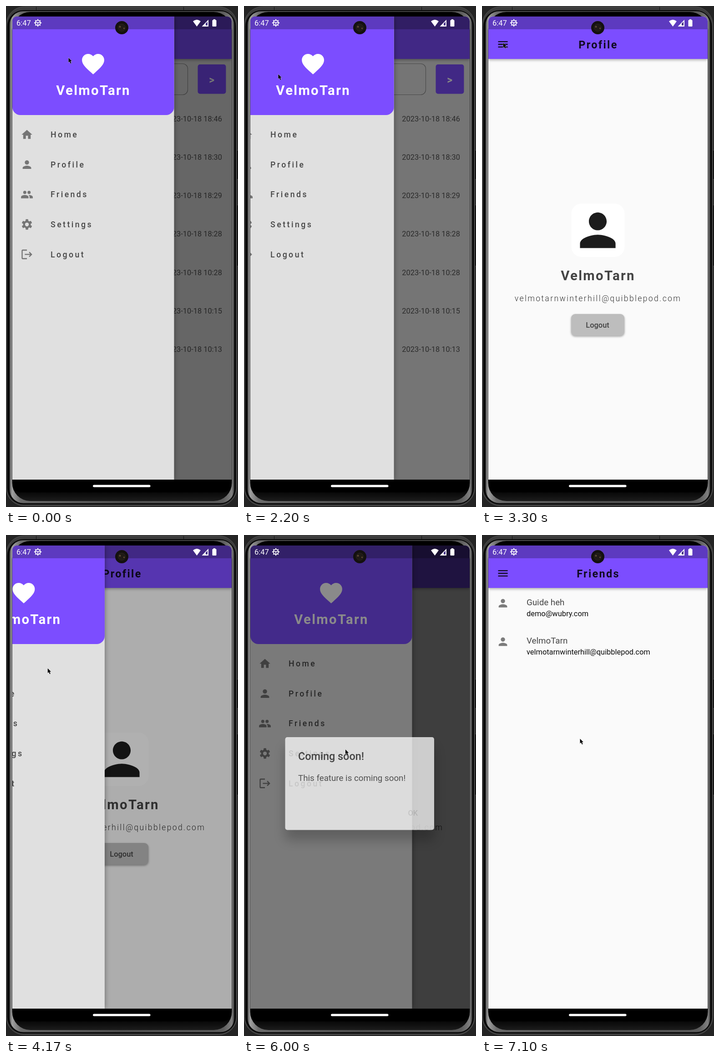
These frames come from a looping animation (510 by 1098 pixels, 7560 ms). An HTML page:

```html
<!DOCTYPE html>
<html lang="en">
<head>
<meta charset="utf-8">
<title>Climbing app walkthrough</title>
<style>
  html, body { margin: 0; width: 100%; height: 100%; overflow: hidden; background: #242424; }
  #stage { display: block; width: 100vw; height: 100vh; font-family: Roboto, sans-serif; }
  .bar { filter: drop-shadow(0 2px 3px rgba(0,0,0,.35)); }
  .drawer { filter: drop-shadow(0 0 6px rgba(0,0,0,.4)); }
  .raised { filter: drop-shadow(0 2px 2px rgba(0,0,0,.35)); }
  #dialog { filter: drop-shadow(0 22px 13px rgba(0,0,0,.3)); }
</style>
</head>
<body>
<svg id="stage" viewBox="0 0 510 1098" preserveAspectRatio="none"></svg>
<script>
const LOOP = 7560, PURPLE = '#7c4dff', USER = 'VelmoTarn', MAIL = 'velmotarnwinterhill@quibblepod.com';
const ROW = 65.6, TILE = 84.3, DRAWER = 355.5;

const ICONS = {
  home: 'M10 20v-6h4v6h5v-8h3L12 3 2 12h3v8z',
  person: 'M12 12c2.21 0 4-1.79 4-4s-1.79-4-4-4-4 1.79-4 4 1.79 4 4 4zm0 2c-2.67 0-8 1.34-8 4v2h16v-2c0-2.66-5.33-4-8-4z',
  people: 'M16 11a3 3 0 1 0 0-6a3 3 0 0 0 0 6zM8 11a3 3 0 1 0 0-6a3 3 0 0 0 0 6zm0 2c-2.33 0-7 1.17-7 3.5V19h14v-2.5c0-2.33-4.67-3.5-7-3.5zm8 0c-.29 0-.62.02-.97.05 1.16.84 1.97 1.97 1.97 3.45V19h6v-2.5c0-2.33-4.67-3.5-7-3.5z',
  logout: 'M17 7l-1.41 1.41L18.17 11H8v2h10.17l-2.58 2.58L17 17l5-5zM4 5h8V3H4c-1.1 0-2 .9-2 2v14c0 1.1.9 2 2 2h8v-2H4V5z',
  menu: 'M3 18h18v-2H3zm0-5h18v-2H3zm0-7v2h18V6z',
  heart: 'M12 21.35l-1.45-1.32C5.4 15.36 2 12.28 2 8.5 2 5.42 4.42 3 7.5 3c1.74 0 3.41.81 4.5 2.09C13.09 3.81 14.76 3 16.5 3 19.58 3 22 5.42 22 8.5c0 3.78-3.4 6.86-8.55 11.54z'
};

// Drawing helpers: each returns SVG markup.
const rect = (x, y, w, h, fill, more = '') =>
  `<rect x="${x}" y="${y}" width="${w}" height="${h}" fill="${fill}" ${more}/>`;
const text = (x, y, str, size, fill, more = '') =>
  `<text x="${x}" y="${y}" font-size="${size}" fill="${fill}" ${more}>${str.replace('>', '&gt;')}</text>`;
const place = (cx, cy, size, inner) =>
  `<g transform="translate(${cx - size / 2} ${cy - size / 2}) scale(${size / 24})">${inner}</g>`;
const icon = (name, cx, cy, fill, size = 28.1) =>
  place(cx, cy, size, `<path d="${ICONS[name]}" fill="${fill}"/>`);
const teeth = (count, x, y, w, h, fill) => Array.from({length: count}, (_, i) =>
  rect(x, y, w, h, fill, `rx=".8" transform="rotate(${i * 360 / count} 12 12)"`)).join('');
const gear = (cx, cy, fill) => place(cx, cy, 28.1,
  `<circle cx="12" cy="12" r="5.4" fill="none" stroke="${fill}" stroke-width="3.7"/>` + teeth(6, 9.6, 2.2, 4.8, 4.6, fill));
const MIDDLE = 'text-anchor="middle"';
const bold = ls => `${MIDDLE} font-weight="700" letter-spacing="${ls}"`;

const tile = (y, title, sub) => icon('person', 46, y, '#7b7b7b') +
  text(98, y + 4.5, title, 18.75, '#464646') + text(98, y + 28, sub, 16.4, '#0c0c0c');

function homeParts() {
  const date = (i, d) => text(475, 252.5 + i * TILE, '2023-10-18 ' + d, 16.4, '#505050', 'text-anchor="end"');
  const posts = [['idkwns', USER], ['lesggogoooo', 'demo'], ['hey waddups peepssja', USER],
    ['SHEEESH', 'demo'], ['SHEESH', USER], ['First post here!', USER]];
  const composer = rect(23.5, 126.5, 376, 68, 'none', 'rx="11" stroke="#8c8c8c" stroke-width="1.2"') +
    text(37, 165.5, 'How was the climb?', 16.4, '#555', 'font-weight="500"') +
    rect(421.5, 128, 62, 64.5, PURPLE, 'rx="5"') + text(452.3, 169.5, '>', 23, '#fff', MIDDLE + ' font-weight="700"');
  const list = icon('person', 46, 237.5, '#7b7b7b') +
    text(98, 233, 'The blue project was', 18.75, '#464646') + text(98, 255, 'insane!', 18.75, '#464646') +
    text(98, 275, USER, 16.4, '#0c0c0c') +
    posts.map(([title, who], i) => tile(321.7 + i * TILE, title, who)).join('') +
    ['18:46', '18:30', '18:29', '18:28', '10:28', '10:15', '10:13'].map((d, i) => date(i, d)).join('');
  return {title: 'GripMoss', bg: '#e0e0e0', fixed: composer, loaded: list};
}

const profileParts = () => ({title: 'Profile', bg: '#fafafa', fixed: '', loaded:
  rect(196.4, 433, 117, 117, '#fff', 'rx="22"') + icon('person', 254.5, 491.5, '#1c1c1c', 117.2) +
  text(255, 600.5, USER, 29.3, '#444', bold(2.34)) +
  text(255, 647, MAIL, 17.6, '#333', MIDDLE + ' font-weight="300" letter-spacing="2.34"') +
  rect(196, 675, 117, 47.5, '#bdbdbd', 'rx="9" class="raised"') +
  text(254, 705, 'Logout', 16.4, '#424242', MIDDLE + ' font-weight="500"')});

const friendsParts = () => ({title: 'Friends', bg: '#fafafa', fixed: '', loaded:
  tile(149.5, 'Guide heh', 'demo@wubry.com') + tile(149.5 + TILE, USER, MAIL)});

function drawer([tapX, tapY, tapRow]) {
  const rows = [['home', 'Home'], ['person', 'Profile'], ['people', 'Friends'], ['gear', 'Settings'], ['logout', 'Logout']];
  const rowTop = 249.2 + tapRow * ROW;
  return rect(14, 23, DRAWER, 1015, '#e0e0e0') +
    `<path d="M14 23h${DRAWER}v198.500a17.500 17.500 0 0 1-17.500 17.500h${35 - DRAWER}a17.500 17.500 0 0 1-17.500-17.500z" fill="${PURPLE}"/>` +
    icon('heart', 191.5, 127, '#fff', 58.6) + text(192, 195.3, USER, 29.3, '#fff', bold(2.34)) +
    `<svg x="14" y="${rowTop}" width="${DRAWER}" height="${ROW}"><circle class="splash" cx="${tapX - 14}" cy="${tapY - rowTop}" opacity=".06"/></svg>` +
    rows.map(([name, label], i) => {
      const y = 282 + i * ROW;
      return (name === 'gear' ? gear(46, y, '#757575') : icon(name, 46, y, '#757575')) +
        text(98, y + 6.2, label, 17.6, '#464646', 'font-weight="500" letter-spacing="3.5"');
    }).join('');
}

// Every page is pushed over the previous one; its drawer opens at drawerAt.
const pages = [
  {parts: homeParts(), enterAt: -9999, drawerAt: -9999, tap: [153, 291, 0]},
  {parts: homeParts(), enterAt: 1373, drawerAt: 2038, tap: [156, 343, 1]},
  {parts: profileParts(), enterAt: 2733, drawerAt: 4088, tap: [150, 405, 2]},
  {parts: friendsParts(), enterAt: 6603, drawerAt: 1e9, tap: [0, 0, 0]}
];

const pageMarkup = ({parts, tap}) => `<g class="page">
  ${rect(14, 23, 482, 1015, '#000', 'class="veil"')}
  <g class="sheet">${rect(14, 23, 482, 1015, parts.bg)}${parts.fixed}
    <g class="loaded">${parts.loaded}</g>
    <circle class="spinner" cx="255" cy="577" r="19" fill="none" stroke="#d2d2d2" stroke-width="4.7" pathLength="100"/>
    ${rect(14, 23, 482, 93, PURPLE, 'class="bar"')}
    ${icon('menu', 46, 84, 'rgba(0,0,0,.87)')}
    ${text(255.5, 92.5, parts.title, 23.4, 'rgba(0,0,0,.87)', bold(2.34))}
    ${rect(14, 23, 482, 1015, '#000', 'class="dim"')}
    <g class="drawer">${drawer(tap)}</g>
  </g></g>`;

// Nested shells from the outside in: casing, dark seam, metal rim, glass.
const phone = `<defs>
    <linearGradient id="metal"><stop offset="0" stop-color="#555"/><stop offset=".011" stop-color="#a0a0a0"/>
      <stop offset=".05" stop-color="#6a6a6a"/><stop offset=".5" stop-color="#505050"/><stop offset=".95" stop-color="#5c5c5c"/>
      <stop offset=".99" stop-color="#808080"/><stop offset="1" stop-color="#444"/></linearGradient>
    <linearGradient id="glass" x2="0" y2="1"><stop offset=".975" stop-color="#000"/><stop offset="1" stop-color="#1c1c1c"/></linearGradient>
    <clipPath id="screen">${rect(14, 23, 482, 1060, '#000', 'rx="10"')}</clipPath>
    <clipPath id="view">${rect(14, 23, 482, 1015, '#000')}</clipPath></defs>` +
  rect(0, 0, 510, 1098, '#242424') +
  rect(507.5, 316, 5, 64, '#080808', 'stroke="#444"') + rect(507.5, 436, 5, 134, '#080808', 'stroke="#444"') +
  rect(.5, 1.5, 507, 1094, '#3c3c3c', 'rx="40" stroke="#555"') +
  rect(66, 2, 1, 7, '#111') + rect(390, 2, 1, 7, '#111') +
  rect(2.5, 9, 503, 1083.5, '#0a0a0a', 'rx="36"') +
  rect(8, 11.5, 493.5, 1078, 'url(#metal)', 'rx="30"') +
  rect(13.5, 13, 483, 1072, 'url(#glass)', 'rx="40"') +
  rect(14, 1020, 482, 46, '#000', 'rx="20"');

const statusBar = rect(14, 23, 482, 28, '#000', 'opacity=".25"') +
  text(23, 43, '6:47', 16.4, '#fff') +
  place(70, 37, 19, '<circle cx="12" cy="12" r="7" fill="none" stroke="#fff" stroke-width="2.2"/>' +
    teeth(8, 10.8, 1.6, 2.4, 4, '#fff') + '<path d="M6 11h12M12 12v6" stroke="#fff" stroke-width="2"/>') +
  '<path d="M411 33.5q8.500-7 17 0L419.500 45z" fill="#fff"/>' +
  '<path d="M430.500 45L445 30v15z" fill="#fff"/><path d="M439 42.500v-4l4-4v8z" fill="#402884"/>' +
  rect(453.5, 30.5, 9, 14.5, '#fff', 'rx="1.5"') + rect(456, 29, 4, 3, '#fff');

const camera = '<circle cx="254.500" cy="47.500" r="14.500" fill="#14110f"/><circle cx="254.500" cy="47.500" r="8" fill="#1f1a16" stroke="#2c251f"/>' +
  '<circle cx="250.500" cy="45.500" r="2" fill="#5c4936"/><circle cx="259.500" cy="49" r="1.400" fill="#6b5136"/>';

const dialog = rect(90.5, 443, 327.5, 203.5, '#fff', 'rx="4.7"') +
  text(119, 493.3, 'Coming soon!', 23.4, '#333', 'font-weight="500"') +
  text(119, 539, 'This feature is coming soon!', 18.75, '#444') +
  text(371.3, 615, 'OK', 16.4, '#dedede', MIDDLE + ' font-weight="500"');

const stage = document.getElementById('stage');
stage.innerHTML = phone +
  `<g clip-path="url(#screen)"><g clip-path="url(#view)">${pages.map(pageMarkup).join('')}
    ${rect(14, 23, 482, 1015, '#000', 'id="barrier"')}<g id="dialog">${dialog}</g></g>${statusBar}</g>` +
  rect(191, 1049.5, 126.5, 5, '#fff', 'rx="2.5"') + camera +
  '<path id="cursor" d="M.5.5v10.300l2.300-2.100 2 4.300 1.800-.8-1.900-4.200h3.100z" fill="#000" stroke="#fff" stroke-width=".7" paint-order="stroke"/>';

const pageEls = [...stage.querySelectorAll('.page')];
const [barrierEl, dialogEl, cursorEl] = ['barrier', 'dialog', 'cursor'].map(id => document.getElementById(id));

const clamp = v => Math.min(1, Math.max(0, v));
const interval = (v, a, b) => clamp((v - a) / (b - a));
const bezier = (x1, y1, x2, y2) => x => {
  const at = (a, b, s) => 3 * a * s * (1 - s) ** 2 + 3 * b * s * s * (1 - s) + s ** 3;
  let lo = 0, hi = 1;
  for (let i = 0; i < 24; i++) {
    const mid = (lo + hi) / 2;
    if (at(x1, x2, mid) < x) lo = mid; else hi = mid;
  }
  return x <= 0 ? 0 : x >= 1 ? 1 : at(y1, y2, lo);
};
const ease = bezier(.25, .1, .25, 1), easeOut = bezier(0, 0, .58, 1);
const zoomStart = bezier(.05, 0, .1333, .06), zoomEnd = bezier(.2083, .82, .25, 1);
const zoom = v => v < 1 / 6 ? .4 * zoomStart(v * 6) : .4 + .6 * zoomEnd((v - 1 / 6) * 1.2);

// Critically damped spring from 0 to 1.
const spring = ms => {
  if (ms <= 0) return 0;
  if (ms > 400) return 1;
  const s = ms / 1000, w = 22.36;
  return clamp(1.005 - (1.005 + (w - 1) * s) * Math.exp(-w * s));
};

const cursorPath = [[0, 137, 113], [30, 137, 113], [400, 204, 235], [620, 180, 342], [770, 168, 330], [830, 157, 352],
  [1000, 156, 352], [1170, 153, 291], [1380, 153, 291], [1700, 61, 77], [1870, 46, 80], [2050, 46, 80], [2500, 156, 343],
  [2810, 156, 343], [3300, 46, 80], [4060, 46, 80], [4170, 91, 291], [4600, 143, 455], [4930, 143, 455], [5070, 138, 450],
  [5230, 138, 450], [5300, 142, 435], [5550, 408, 600], [5700, 385, 612], [5910, 385, 612], [6000, 223, 470],
  [6330, 150, 405], [6640, 150, 405], [7100, 215, 446], [LOOP, 215, 446]];

// Hermite interpolation that comes to rest wherever the pointer pauses.
function cursorAt(t) {
  const i = Math.max(1, cursorPath.findIndex(p => p[0] > t));
  const still = (a, b) => !a || !b || Math.hypot(a[1] - b[1], a[2] - b[2]) < 2;
  const slope = (k, axis) => {
    const [p, c, n] = [cursorPath[k - 1], cursorPath[k], cursorPath[k + 1]];
    return still(p, c) || still(c, n) ? 0 : (n[axis] - p[axis]) / (n[0] - p[0]);
  };
  const a = cursorPath[i - 1], b = cursorPath[i], dt = b[0] - a[0], u = clamp((t - a[0]) / dt), v = 1 - u;
  return [1, 2].map(axis => a[axis] * v * v * (1 + 2 * u) + b[axis] * u * u * (3 - 2 * u) +
    dt * u * v * (slope(i - 1, axis) * v - slope(i, axis) * u));
}

function drawPage(el, page, next, t) {
  const age = t - page.enterAt, enter = clamp(age / 300);
  const left = next ? t - next.enterAt : -1, exit = clamp(left / 300);
  const shown = age >= 0 && exit < 1;
  el.style.display = shown ? '' : 'none';
  if (!shown) return;
  const part = name => el.querySelector('.' + name);
  const scale = (.85 + .15 * zoom(enter)) * (1 + .05 * zoom(exit));
  part('veil').setAttribute('opacity', enter < 1 ? .6 * interval(enter, .2075, .4175) : 0);
  part('sheet').setAttribute('opacity', interval(enter, .125, .25));
  part('sheet').setAttribute('transform', `translate(255 530.5) scale(${scale}) translate(-255 -530.5)`);

  const loaded = age > 250, spinner = part('spinner');
  part('loaded').style.display = loaded ? '' : 'none';
  spinner.style.display = loaded ? 'none' : '';
  spinner.setAttribute('stroke-dasharray', `${2 + 60 * ease(clamp(age / 667 - .15))} 200`);
  spinner.setAttribute('transform', `rotate(${-90 + age * .1} 255 577)`);

  const open = spring(t - page.drawerAt);
  part('dim').setAttribute('opacity', .54 * open);
  part('drawer').style.display = open ? '' : 'none';
  part('drawer').setAttribute('transform', `translate(${DRAWER * (open - 1)} 0)`);
  part('splash').setAttribute('r', left > 0 ? 16 + .35 * left : 0);
}

function draw(t) {
  pages.forEach((page, i) => drawPage(pageEls[i], page, pages[i + 1], t));
  const shown = clamp((t - 4925) / 150) - clamp((t - 5934) / 150);
  barrierEl.setAttribute('opacity', .54 * ease(shown));
  dialogEl.setAttribute('opacity', easeOut(shown));
  dialogEl.style.display = shown ? '' : 'none';
  cursorEl.setAttribute('transform', `translate(${cursorAt(t)})`);
}

const start = performance.now();
function tick() {
  draw((performance.now() - start) % LOOP);
  requestAnimationFrame(tick);
}
tick();
</script>
</body>
</html>
```
